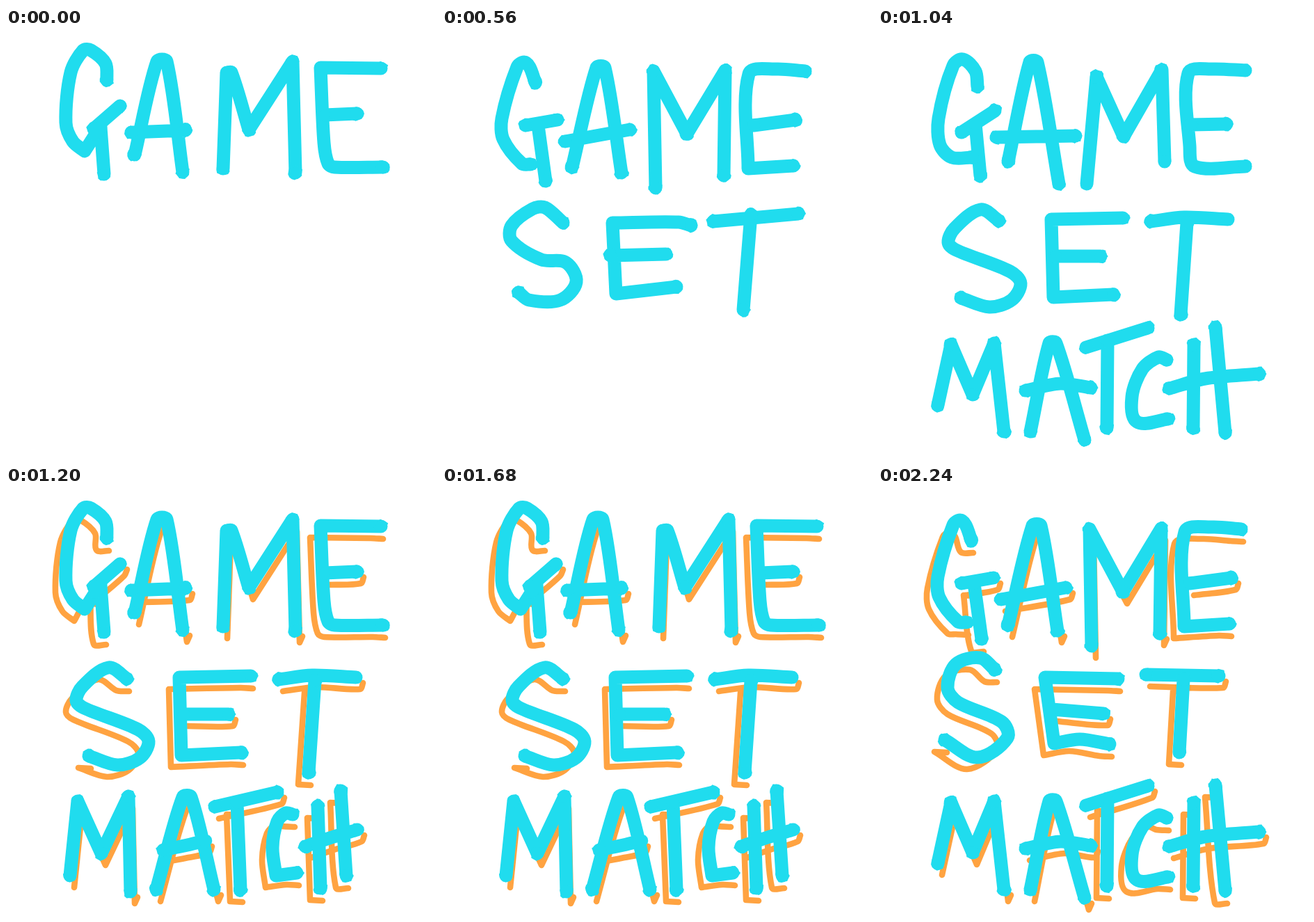
An HTML page with a canvas for the animation above (2320 ms loop, 618x618 px).

```html
<!DOCTYPE html>
<html lang="en">
<head>
<meta charset="utf-8">
<title>Game Set Match</title>
<style>
html, body { margin: 0; width: 100%; height: 100%; overflow: hidden; background: #fff; }
canvas { display: block; }
</style>
</head>
<body>
<canvas id="stage" width="618" height="618"></canvas>
<script>
// A letter has three poses; strokes within a pose are separated by "/".
const parse = text => text.split('/').map(s => s.split(' ').map(p => p.split(',').map(Number)));
const mean = (a, b) => a.map((v, i) => Array.isArray(v) ? mean(v, b[i]) : (v + b[i]) / 2);

// A missing third pose lies halfway between the other two.
function letter(...texts) {
  const poses = texts.map(parse);
  if (poses.length < 3) poses.push(mean(...poses));
  return poses;
}

const gameG = letter(
  '145,75 143,51 122,32 111,32 93,64 86,136 96,163 113,177 129,152/126,145 164,112/136,143 141,210',
  '134,78 126,56 118,49 108,56 86,130 88,160 115,195 127,196/120,140 166,132/138,140 149,220',
  '143,84 140,62 122,45 108,54 87,130 89,168 106,186 135,186/120,150 168,119/140,138 147,212');
const gameA = letter(
  '185,182 217,48 231,48 254,207/180,150 258,147',
  '187,200 222,57 234,57 258,208/177,163 270,146',
  '187,192 218,49 229,49 260,224/170,157 284,155');
const gameM = letter(
  '312,202 317,64 324,64 349,146 412,48 416,208',
  '307,230 304,62 352,152 407,61 405,212',
  '300,224 314,70 353,156 408,60 412,192');
const gameE = letter(
  '539,58 452,57 457,165 463,195 472,200 542,200/458,125 504,123',
  '522,62 480,59 441,66 440,202 505,198/448,140 508,132',
  '528,61 480,59 446,65 448,170 455,199 528,199/450,139 500,138');

const setS = letter(
  '174,277 147,261 110,288 101,308 112,319 190,350 205,367 192,391 160,401 119,388',
  '168,264 147,247 112,256 100,290 115,311 178,339 186,362 143,390 96,365',
  '174,280 148,258 130,260 100,284 100,306 143,333 178,337 193,365 170,391 125,391 110,380');
const setE = letter(
  '352,273 249,275 252,387 338,383/255,328 320,328',
  '345,277 240,275 253,370 290,364 333,371/250,321 324,327',
  '358,284 340,279 245,280 250,382 337,372/242,327 322,325');
const setT = letter(
  '392,278 440,272 503,275/444,280 435,412',
  '385,271 490,273/439,278 433,383',
  '390,278 512,267/444,268 433,405');

const matchM = letter(
  '92,560 103,453 137,528 176,446 179,583',
  '86,542 105,455 136,527 167,453 181,580');
const matchA = letter(
  '216,580 254,447 266,447 299,580/226,523 256,517 286,510',
  '219,580 246,453 256,453 297,592/212,521 262,511 306,517');
const matchT = letter(
  '300,461 390,440/332,455 337,580',
  '299,459 388,431/330,450 329,575');
const matchC = letter(
  '412,472 402,470 390,482 383,520 388,560 418,556',
  '415,477 403,473 380,490 365,530 372,566 417,562');
const matchH = letter(
  '448,460 452,578/430,518 468,505 505,494/481,438 489,560',
  '454,455 453,575/419,518 470,504 548,497/485,430 499,582');

const words = [
  [gameG, gameA, gameM, gameE],
  [setS, setE, setT],
  [matchM, matchA, matchT, matchC, matchH]
];

const sub = (a, b) => [a[0] - b[0], a[1] - b[1]];
const move = (p, x, y) => [p[0] + x, p[1] + y];
const unit = v => v.map(c => c / Math.hypot(...v));

// Cosine of the turn at an inner point: 1 is straight on, -1 doubles back
function turn(pts, i) {
  const a = unit(sub(pts[i], pts[i - 1])), b = unit(sub(pts[i + 1], pts[i]));
  return a[0] * b[0] + a[1] * b[1];
}

// Curve through all points, with hard corners at sharp turns
function addCurve(path, pts) {
  const last = pts.length - 1;
  const tangents = pts.map((p, i) =>
    i > 0 && i < last && turn(pts, i) > 0.1 ? unit(sub(pts[i + 1], pts[i - 1])) : null);
  path.moveTo(...pts[0]);
  for (let i = 1; i <= last; i++) {
    const a = pts[i - 1], b = pts[i], chord = sub(b, a);
    const pull = Math.hypot(...chord) * 0.3, straight = unit(chord);
    const s = tangents[i - 1] || straight, e = tangents[i] || straight;
    path.bezierCurveTo(...move(a, s[0] * pull, s[1] * pull),
      ...move(b, -e[0] * pull, -e[1] * pull), ...b);
  }
}

let seed = 7;
const random = () => (seed = seed * 16807 % 2147483647) / 2147483647;

// Rough dab where the brush touches down, lifts or doubles back
function addDab(path, [x, y]) {
  for (let i = 0; i < 15; i++) {
    const angle = i / 15 * 2 * Math.PI, r = 8.2 + random() * 3;
    path[i ? 'lineTo' : 'moveTo'](x + r * Math.cos(angle), y + r * Math.sin(angle));
  }
  path.closePath();
}

// Shadow line below and left of a stroke, hooked at its ends
function shadowOf(pts) {
  const [w, h] = sub(pts[pts.length - 1], pts[0]);
  const isBar = Math.abs(w) > Math.abs(h);
  const line = pts.map(p => move(p, isBar ? 6 : -15, 17));
  const end = line[line.length - 1];
  if (isBar) return [...line, move(end, 4, -9)];
  return [move(line[0], 18, 1), ...line, move(end, 18, 1)];
}

function build(strokes) {
  const line = new Path2D(), dabs = new Path2D(), shadow = new Path2D();
  for (const pts of strokes) {
    addCurve(line, pts);
    addCurve(shadow, shadowOf(pts));
    pts.forEach((p, i) => {
      const inner = i > 0 && i < pts.length - 1;
      if (!inner || turn(pts, i) < -0.3) addDab(dabs, p);
    });
  }
  return { line, dabs, shadow };
}

const art = words.map(word => [0, 1, 2].map(pose => build(word.flatMap(poses => poses[pose]))));
const ctx = document.getElementById('stage').getContext('2d');
ctx.lineCap = ctx.lineJoin = 'round';

function stroke(path, color, width) {
  ctx.strokeStyle = color;
  ctx.lineWidth = width;
  ctx.stroke(path);
}

const STEP = 80, LOOP = 2320, SHADOW_START = 15, CYAN = '#20dcee';

function draw() {
  const i = Math.floor(performance.now() % LOOP / STEP);
  const shaded = i >= SHADOW_START;
  const count = shaded ? 3 : 1 + Math.floor(i / 5);
  const beat = i < 10 ? i : i + 1;
  const shown = art.slice(0, count).map((poses, w) => poses[(shaded ? i : beat + w) % 3]);

  ctx.fillStyle = '#fff';
  ctx.fillRect(0, 0, 618, 618);
  if (shaded) shown.forEach(word => stroke(word.shadow, '#ffa341', 8.6));
  ctx.fillStyle = CYAN;
  for (const word of shown) {
    stroke(word.line, CYAN, 19);
    ctx.fill(word.dabs);
  }
  requestAnimationFrame(draw);
}
draw();
</script>
</body>
</html>
```
